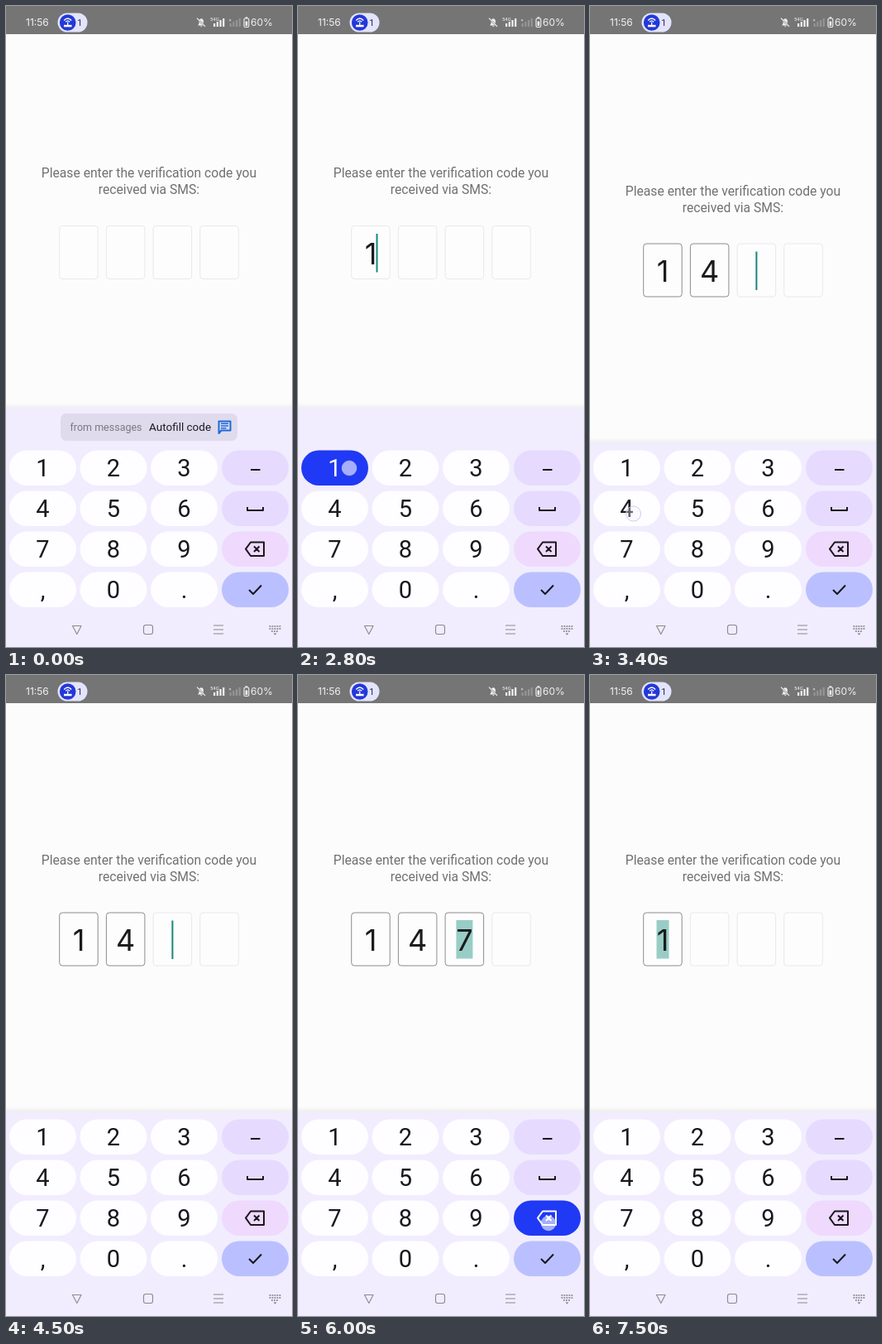
Animation, 346 px wide and 774 px high, one loop 8000 ms. Source, as an HTML page:

```html
<!DOCTYPE html>
<html lang="en">
<head>
<meta charset="utf-8">
<title>Verification code</title>
<style>
html, body { margin: 0; width: 100%; height: 100%; overflow: hidden; background: #fcfcfc; }
svg { display: block; width: 346px; height: 774px; }
text { font-family: Roboto, sans-serif; }
.mid { text-anchor: middle; }
.digit { font-family: Inter, sans-serif; font-size: 36px; fill: #1b1b1d; text-anchor: middle; }
.line { fill: none; stroke-width: 2; stroke-linejoin: round; }
.nav { fill: none; stroke: #8b8990; stroke-width: 1.1; stroke-linejoin: round; }
</style>
</head>
<body>
<svg viewBox="0 0 346 774">
  <defs>
    <linearGradient id="shade" x1="0" y1="0" x2="0" y2="1">
      <stop offset="0" stop-color="#fcfcfc"/><stop offset="1" stop-color="#eeeef1"/>
    </linearGradient>
  </defs>
  <rect width="346" height="774" fill="#fcfcfc"/>

  <g id="form">
    <g class="mid" font-size="15.7" fill="#717173">
      <text x="173" y="207">Please enter the verification code you</text>
      <text x="173" y="227">received via SMS:</text>
    </g>
    <g id="boxes"></g>
    <rect id="caret" y="275" width="2" height="46.5" fill="#17877b"/>
  </g>

  <g id="edge">
    <rect y="-7" width="346" height="7" fill="url(#shade)"/>
    <rect width="346" height="300" fill="#f1edfe"/>
  </g>
  <g id="chip">
    <rect x="66" y="492" width="214" height="33" rx="7" fill="#e0dbec"/>
    <text x="77.5" y="513" font-size="12.5" fill="#7b7783">from messages</text>
    <text x="173" y="513" font-size="13.5" fill="#1d1b22">Autofill code</text>
    <path class="line" stroke="#1b6be0" stroke-width="1.8" d="M257.5 516V501.500H271.500V512.500H260.500Z"/>
    <path stroke="#1b6be0" stroke-width="1.5" d="M260 504.300h9M260 507h9M260 509.700h6.500"/>
  </g>
  <g id="keys"></g>
  <circle id="touch" r="9"/>

  <g class="nav">
    <path d="M80.500 748.500H91L85.800 758.500Z"/>
    <rect x="166.500" y="747.500" width="11" height="11" rx="2.500"/>
    <path d="M251 748h12M251 753h12M251 758h12"/>
  </g>
  <path d="M318.500 749h14M318.500 752h14M321 755h9" stroke="#77757c" stroke-width="1.7" stroke-dasharray="1.8 1.2"/>
  <path d="M323.500 757.500h4l-2 2z" fill="#77757c"/>

  <rect width="346" height="34" fill="#757575"/>
  <text x="24" y="24.300" font-size="12" fill="#f4f4f4" style="font-family:Inter,sans-serif">11:56</text>
  <rect x="62.500" y="8.500" width="36" height="23" rx="11.500" fill="#e3e4fb"/>
  <circle cx="74.700" cy="20" r="9.800" fill="#2338d8"/>
  <g stroke="#fff" fill="none" stroke-width="1.300">
    <path d="M70.200 17.500Q74.700 12.500 79.200 17.500M72.200 19.300Q74.700 16.600 77.200 19.300"/>
    <path d="M74.700 19.500v4"/>
    <rect x="70" y="22.800" width="9.500" height="2.500" fill="#fff" stroke="none"/>
  </g>
  <text x="86" y="24" font-size="11.500" fill="#252a55">1</text>
  <g fill="#f2f2f2">
    <path d="M232 23.500l1.500-2v-3q0-3 2.700-3.300 2.700.3 2.700 3.300v3l1.500 2zM235 24.300h2.500l-1.200 1.200z"/>
    <path d="M231 15l10.500 10" stroke="#757575" stroke-width="2.200"/>
    <path d="M231 14.600l10 10.200" stroke="#f2f2f2" stroke-width="1.200"/>
    <text x="247" y="18" font-size="6">54G</text>
    <g id="bars"></g>
    <text x="269.500" y="19" font-size="6">×</text>
    <rect x="288" y="15" width="5.800" height="10.500" rx="1.500" fill="none" stroke="#f2f2f2" stroke-width="1.100"/>
    <rect x="289.500" y="13.300" width="2.800" height="1.500"/>
    <rect x="289.600" y="18.500" width="2.600" height="5.500"/>
    <text x="296" y="24.300" font-size="12" style="font-family:Inter,sans-serif">60%</text>
  </g>
</svg>
<script>
const $ = id => document.getElementById(id);
const LOOP = 8000, STEP = 100;
const within = (t, a, b) => t >= a && t < b;
const set = (el, attrs) => { for (const k in attrs) el.setAttribute(k, attrs[k]); };
const show = (el, on) => el.setAttribute('visibility', on ? 'visible' : 'hidden');

const INK = '#18181d', PRESSED = '#2039f4';
const colX = [4, 89.500, 175, 261];
const labels = ['1', '2', '3', 'dash', '4', '5', '6', 'space', '7', '8', '9', 'back', ',', '0', '.', 'enter'];
const icons = {
  dash: 'M-5.500 2.500h11.500',
  space: 'M-9.500-1.500v4h19v-4',
  back: 'M-5.500-8H10.500V8.500H-5.500L-11.500 .2ZM-1.500-3l6.500 6.500M5-3l-6.500 6.500',
  enter: 'M-7.500 .5l5 5 10-10.500'
};
const tints = { dash: '#e6dbfe', space: '#e6dbfe', back: '#efd9fd', enter: '#bac0ff' };

$('keys').innerHTML = labels.map((name, i) => {
  const x = colX[i % 4], y = 536.500 + 49 * (i >> 2), cx = x + 40.500, cy = y + 21;
  const face = icons[name]
    ? `<path class="line" d="${icons[name]}" transform="translate(${cx} ${cy})" stroke="${INK}"/>`
    : `<text class="mid" x="${cx}" y="${cy + 10.500}" font-size="29" fill="${INK}">${name}</text>`;
  return `<g><rect x="${x}" y="${y}" width="81" height="42.500" rx="21.250" fill="${tints[name] || '#fefdff'}"/>${face}</g>`;
}).join('');
const keys = [...$('keys').children];

$('bars').innerHTML = [251, 270.500].map((x, n) => [0, 1, 2, 3].map(i => {
  const h = 4 + i * 2;
  return `<rect x="${x + i * 3.700}" y="${25 - h}" width="2.200" height="${h}" opacity="${n ? .25 : 1}"/>`;
}).join('')).join('');

// Per box: digit, half width, typed, border darkens, selected, deleted
const cells = [
  { d: '1', half: 7.500, typed: 2800, left: 3100, pick: 7300, gone: LOOP },
  { d: '4', half: 11, typed: 3300, left: 3400, pick: 6600, gone: 7300 },
  { d: '7', half: 10, typed: 4800, left: 4900, pick: 6000, gone: 6600 },
  { d: '', half: 0, typed: LOOP, left: LOOP, pick: LOOP, gone: LOOP }
];
const boxX = i => 88 + 56.700 * i;
$('boxes').innerHTML = cells.map((c, i) => `<g>
  <rect x="${boxX(i) - 23.300}" y="265.500" width="46.500" height="64" rx="3.500" fill="#fdfdfd"/>
  <rect x="${boxX(i) - c.half}" y="274.500" width="${c.half * 2}" height="46.500" fill="#98cdc6"/>
  <text class="digit" x="${boxX(i)}" y="311.500">${c.d}</text></g>`).join('');
const boxes = [...$('boxes').children].map(g => g.children);

// Caret: box, from, to
const carets = [
  [0, 200, 700], [0, 1200, 1700], [0, 2200, 3100], [1, 3100, 3400],
  [2, 3400, 4000], [2, 4500, 4900], [3, 4900, 5400], [3, 5900, 6000]
];

// Touches: key, down, up, mark gone, x, y
const taps = [
  [0, 2700, 2900, 3100, 62, 558],
  [4, 3200, 3400, 3600, 52.500, 613],
  [8, 4700, 4900, 5000, 54, 661],
  [11, 5900, 6100, 6200, 303, 662],
  [11, 6500, 6700, 6800, 303, 662],
  [11, 7200, 7200, 7500, 304, 662]
];

function draw(t) {
  const p = Math.min(1, Math.max(0, (t - 3000) / 300));
  const ease = p * p * (3 - 2 * p);
  $('form').setAttribute('transform', `translate(0 ${21.500 * ease})`);
  $('edge').setAttribute('transform', `translate(0 ${486 + 42 * ease})`);
  show($('chip'), t < 2800);

  cells.forEach((c, i) => {
    const [frame, mark, digit] = boxes[i];
    const full = within(t, c.typed, c.gone);
    set(frame, { stroke: full && t >= c.left ? '#8c8c8e' : '#e9e8ef' });
    show(mark, within(t, c.pick, c.gone));
    show(digit, full);
  });

  const caret = carets.find(c => within(t, c[1], c[2]));
  show($('caret'), caret);
  if (caret) {
    const c = cells[caret[0]];
    set($('caret'), { x: boxX(caret[0]) - 1 + (t >= c.typed ? c.half : 0) });
  }

  keys.forEach((key, i) => {
    const down = taps.some(a => a[0] === i && within(t, a[1], a[2]));
    const [plate, face] = key.children;
    plate.setAttribute('fill', down ? PRESSED : tints[labels[i]] || '#fefdff');
    face.setAttribute(icons[labels[i]] ? 'stroke' : 'fill', down ? '#fff' : INK);
  });

  const tap = taps.find(a => within(t, a[1], a[3]));
  show($('touch'), tap);
  if (tap) {
    const down = t < tap[2];
    set($('touch'), {
      cx: tap[4], cy: tap[5],
      fill: down ? '#fff' : '#f4f4ff', 'fill-opacity': down ? .6 : .35,
      stroke: '#c5caef', 'stroke-opacity': down ? .4 : .9
    });
  }
}

const start = performance.now();
function tick() {
  const t = (performance.now() - start) % LOOP;
  draw(Math.floor(t / STEP) * STEP);
  requestAnimationFrame(tick);
}
draw(0);
requestAnimationFrame(tick);
</script>
</body>
</html>
```
